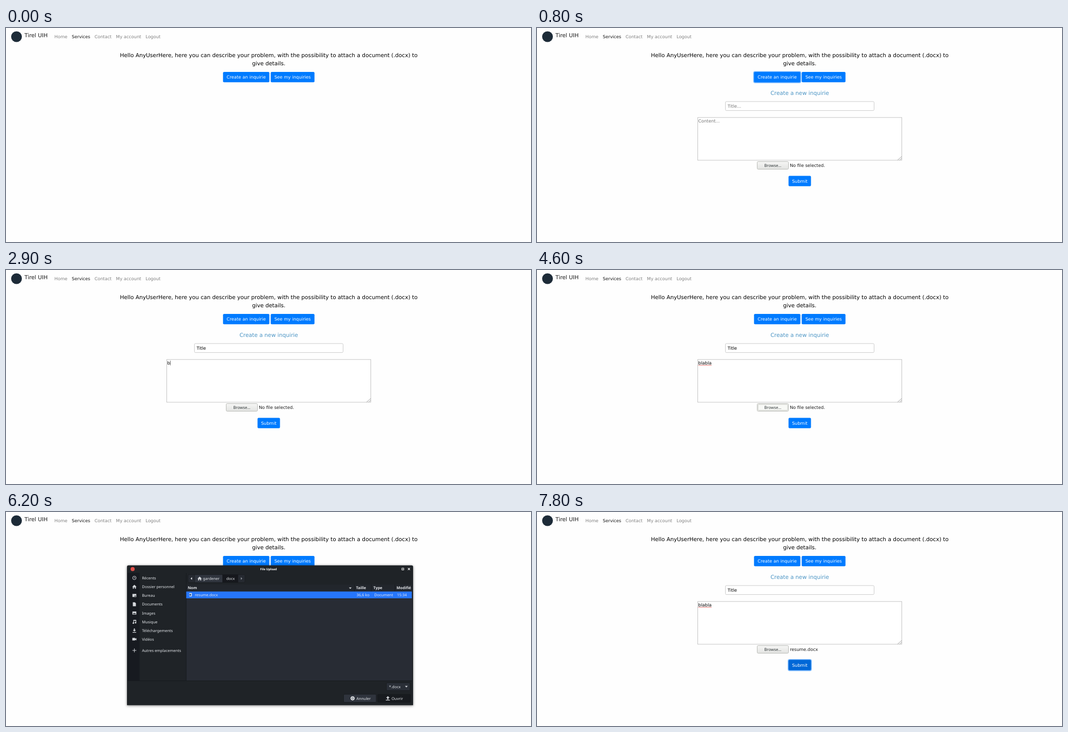
Recreate the animation shown at these times as an HTML page. Size 1024 px wide and 419 px high, loop 8 s.

```html
<!DOCTYPE html>
<html lang="en">
<head>
<meta charset="utf-8">
<title>Inquiry form</title>
<style>
  html, body { margin: 0; width: 100%; height: 100%; overflow: hidden; background: #fefefe; }
  svg { display: block; width: 100%; height: 100%; }
  text { font: 8.533px "DejaVu Sans", sans-serif; fill: #191919; text-rendering: geometricPrecision; white-space: pre; }
  .big { font-size: 10.667px; }
  .mid { text-anchor: middle; }
  .off { fill: #7f7f7f; }
  .btn text { fill: #fff; text-anchor: middle; }
  .field { fill: #fff; stroke: #c6c6c6; stroke-width: .9; }
  .caret { width: .6px; height: 9px; fill: #000; }
  #browse text { font: 7.9px "Noto Sans", sans-serif; fill: #2e3436; }
  #dialog { filter: drop-shadow(0 1px 2.5px rgba(0, 0, 0, .5)); }
  #dialog text { font: 7.467px "Noto Sans", sans-serif; fill: #e3e6ea; }
  #dialog .bold { font-weight: 700; }
  .icon { fill: #d5d8dc; }
  .line { fill: none; stroke: #d5d8dc; }
</style>
</head>
<body>
<svg viewBox="0 0 1024 419">
  <defs>
    <linearGradient id="plain" x2="0" y2="1">
      <stop stop-color="#f6f6f5"/><stop offset="1" stop-color="#e3e4e2"/>
    </linearGradient>
  </defs>
  <rect width="1024" height="419" fill="#fefefe"/>

  <circle cx="20.5" cy="17" r="10.5" fill="#1d2b38"/>
  <text class="big" x="36" y="18.3">Tirel UIH</text>
  <g>
    <text class="off" x="94.6" y="20.2">Home</text>
    <text x="128.3" y="20.2">Services</text>
    <text class="off" x="172.8" y="20.2">Contact</text>
    <text class="off" x="214.6" y="20.2">My account</text>
    <text class="off" x="272.3" y="20.2">Logout</text>
  </g>

  <g fill="#000">
    <text class="big mid" x="512.5" y="57" style="fill:#000">Hello AnyUserHere, here you can describe your problem, with the possibility to attach a document (.docx) to</text>
    <text class="big mid" x="512.5" y="73" style="fill:#000">give details.</text>
  </g>

  <g class="btn" id="create">
    <rect x="423.3" y="86.1" width="90.4" height="20.2" rx="2.1"/>
    <text x="468.5" y="99.3">Create an inquirie</text>
  </g>
  <g class="btn">
    <rect x="516.3" y="86.1" width="85.4" height="20.2" rx="2.1" fill="#007bff"/>
    <text x="559" y="99.3">See my inquiries</text>
  </g>

  <g id="form">
    <text class="big mid" x="512.5" y="131" style="fill:#4a94c4">Create a new inquirie</text>
    <rect class="field" id="titleBox" x="367.5" y="144" width="290" height="17.6" rx="2.1"/>
    <text id="title" x="371.8" y="156.1"></text>
    <rect class="caret" id="titleCaret" y="148.6"/>

    <rect class="field" x="313.5" y="175.2" width="398" height="83.7" style="stroke:#bcbcbc"/>
    <path d="M703.5 258.5l8-7M707.5 258.5l4-3.5" stroke="#777" stroke-width=".7"/>
    <text id="body" x="314.5" y="185.2"></text>
    <rect class="caret" id="bodyCaret" y="177.6"/>
    <path id="squiggle" fill="none" stroke="#e2433b" stroke-width=".7"/>

    <g id="browse">
      <rect id="browseBox" x="429.5" y="261.5" width="61" height="15" rx="2" stroke="#b9bab6"/>
      <rect id="browseFocus" x="431.2" y="263.2" width="57.6" height="11.6" rx="1" fill="none" stroke="#b4b6b1" stroke-width=".7"/>
      <text class="mid" x="460" y="271.8">Browse…</text>
    </g>
    <text id="file" x="493.2" y="272"></text>

    <g class="btn" id="submit">
      <rect x="490.6" y="289.6" width="43.8" height="20.2" rx="2.1"/>
      <text x="512.5" y="302.5">Submit</text>
    </g>
  </g>

  <g id="dialog">
    <path d="M236 378.3V107.5q0-3 3-3H791q3 0 3 3V378.3z" fill="#1f2327"/>
    <path d="M237 119h23.5v211H237z" fill="#171a20"/>
    <path d="M351.5 142h440.5v188H351.5z" fill="#282c34"/>
    <path d="M351.5 142h440.5v13.5H351.5z" fill="#22262c"/>
    <path d="M237 330.5H793M351.5 119.500V330M679.5 142v13.500M712.5 142v13.500M758.5 142v13.500" stroke="#15181c" stroke-width=".8"/>

    <circle cx="247" cy="111.800" r="4" fill="#e2504a"/>
    <text class="bold mid" x="512" y="114" style="font-size:5.87px;fill:#fff">File Upload</text>
    <rect x="772.2" y="110" width="3.600" height="3.400" class="line" style="stroke:#fff"/>
    <path d="M783.900 109.700l4 4m0-4l-4 4" class="line" style="stroke:#fff;stroke-width:1.2"/>

    <g stroke="#16191d" stroke-width=".6">
      <rect x="355" y="122.700" width="111" height="15.300" rx="2" fill="#262a31"/>
      <path d="M368 122.700h54.500V138H368z" fill="#30353e"/>
      <path d="M422.500 122.700h30V138h-30z" fill="#16181d"/>
    </g>
    <path d="M363 127.800v5l-3-2.500z" class="icon"/>
    <path d="M458 127.800v5l3-2.500z" fill="#858a91"/>
    <path d="M373.500 130.500l4.200-4 4.200 4h-1.200v3.500h-2v-2.500h-2v2.500h-2v-3.500z" class="icon"/>
    <text x="384" y="133">gardener</text>
    <text x="429.700" y="133">docx</text>

    <text class="bold" x="354.500" y="151.400">Nom</text>
    <path d="M668.800 147.700h5.400l-2.700 2.900z" class="icon"/>
    <text class="bold" x="682.800" y="151.400">Taille</text>
    <text class="bold" x="716.500" y="151.400">Type</text>
    <text class="bold" x="761.800" y="151.400">Modifié</text>

    <rect id="row" x="351.500" y="155.700" width="440" height="13.300" fill="#2676fc"/>
    <rect x="357.600" y="158.800" width="4.800" height="6.400" rx=".5" fill="#dce6f2"/>
    <rect x="358" y="160.500" width="3" height="3.200" fill="#2b579a"/>
    <text x="368.200" y="165">resume.docx</text>
    <text x="683.800" y="165">36,6 ko</text>
    <text x="718.300" y="165">Document</text>
    <text x="762.800" y="165">15:34</text>

    <g id="places"></g>

    <g stroke="#15181c" stroke-width=".7">
      <rect x="742" y="334.500" width="46" height="15" rx="1.500" fill="#2a2f37"/>
      <rect x="658.500" y="357" width="63.500" height="15.500" rx="1.500" fill="#2f343d"/>
      <rect id="open" x="725" y="357" width="64" height="15.500" rx="1.500"/>
    </g>
    <text x="747" y="344.700">*.docx</text>
    <path d="M778.200 340.500h5.400l-2.700 3z" class="icon"/>
    <circle cx="676" cy="364.800" r="3.500" fill="#d5d8dc" stroke="#fff"/>
    <circle cx="676" cy="364.800" r="1.900" fill="none" stroke="#4a5058" stroke-width=".8"/>
    <text x="683.600" y="367.800">Annuler</text>
    <g id="openLabel">
      <path d="M744.800 360.500l3.500 3.600h-2.400v3h-2.200v-3h-2.400zM740.800 367.800h8v1.300h-8z" class="icon"/>
      <text x="752" y="367.800">Ouvrir</text>
    </g>
  </g>
</svg>
<script>
const $ = id => document.getElementById(id);
const ramp = (t, a, b) => Math.min(1, Math.max(0, (t - a) / (b - a)));
const show = (id, on) => $(id).setAttribute("opacity", +on);
const within = (t, a, b) => t >= a && t < b;

// Icons are drawn around the point (0, 0)
const places = [
  ["Récents", 129, '<circle r="3.400" class="line"/><path d="M0-2V.3L1.500 0" class="line" stroke-width=".8"/>'],
  ["Dossier personnel", 146.2, '<path d="M-4.200 .4L0-3.800 4.200 .4H3V4H1V1.300H-1V4H-3V.4z"/>'],
  ["Bureau", 163.4, '<path d="M-3.800-3H3.800V3H-3.800z"/><path d="M.3 .4h2.500v1.600H.3z" fill="#171a20"/>'],
  ["Documents", 180.6, '<path d="M-3-3.800H1L3-1.800V3.800H-3z"/>'],
  ["Images", 197.8, '<path d="M-3.800-3H3.800V3H-3.800z"/><path d="M-2.800 2L-1 -.5 .3 1 1.500-.3 2.900 2z" fill="#171a20"/>'],
  ["Musique", 214.9, '<path d="M-2-3.600H3.600V2H2.400V-1.800H-.8V3H-2z"/><circle cx="-2" cy="2.500" r="1.500"/><circle cx="2.300" cy="1.800" r="1.500"/>'],
  ["Téléchargements", 232, '<path d="M-.9-4H.9V-1H3L0 2-3-1H-.9zM-3.500 3H3.500V4.200H-3.500z"/>'],
  ["Vidéos", 249.1, '<path d="M-4-2.500H1.500V-.8L4-2.300V2.300L1.500 .8V2.500H-4z"/>'],
  ["Autres emplacements", 271, '<path d="M-3.800 0H3.800M0-3.800V3.800" class="line"/>']
];
$("places").innerHTML = places.map(([name, y, icon]) =>
  `<g class="icon" transform="translate(250.400 ${y})">${icon}</g><text x="265.200" y="${y + 2.8}">${name}</text>`).join("");
$("squiggle").setAttribute("d", "M314.500 187.200" + "l1-1.200l1 1.200".repeat(13));

// Each entry: [time, text]
const titleKeys = [[1700, "T"], [1900, "Ti"], [2000, "Tit"], [2100, "Titl"], [2200, "Title"]];
const bodyKeys = [[2900, "b"], [3100, "bla"], [3300, "blab"], [3400, "blabl"], [3600, "blabla"]];

function type(id, t, keys, hint, focused) {
  const typed = keys.filter(k => k[0] <= t).pop();
  const el = $(id), caret = $(id + "Caret");
  el.textContent = typed ? typed[1] : hint;
  el.style.fill = typed ? "#000" : "#757575";
  const width = typed ? el.getComputedTextLength() : 0;
  caret.setAttribute("x", +el.getAttribute("x") + width + .1);
  show(id + "Caret", focused);
}

function button(id, hover, ring) {
  const box = $(id).firstElementChild;
  box.setAttribute("fill", `rgb(0 ${123 - 20 * hover} ${255 - 40 * hover})`);
  box.style.filter = "none";
  box.style.stroke = `rgba(0, 123, 255, ${ring * .5})`;
  box.style.strokeWidth = "3.200px";
  box.style.paintOrder = "stroke";
}

function draw(t) {
  button("create", ramp(t, 0, 200) - ramp(t, 600, 800), ramp(t, 200, 500) - ramp(t, 1000, 1200));
  button("submit", ramp(t, 6900, 7200), ramp(t, 7500, 7800));
  show("form", t >= 300);

  const inTitle = within(t, 1100, 2500);
  type("title", t, titleKeys, "Title...", inTitle);
  type("body", t, bodyKeys, "Content...", within(t, 2500, 4600));
  $("titleBox").style.stroke = inTitle ? "#9cc6f2" : "#c6c6c6";
  show("squiggle", t >= 4600);

  $("browseBox").setAttribute("fill", within(t, 4400, 6500) ? "#f8f9f6" : "url(#plain)");
  show("browseFocus", within(t, 4600, 6400) || within(t, 6500, 7600));
  $("file").textContent = t < 6400 ? "No file selected." : "resume.docx";

  show("dialog", 0);
  if (t < 6400) $("dialog").setAttribute("opacity", ramp(t, 4600, 4900));
  show("row", t >= 6000);
  $("open").setAttribute("fill", t < 6000 ? "#23272d" : t < 6100 ? "#2f343d" : t < 6200 ? "#3a404a" : "#181b1f");
  show("openLabel", t < 6000 ? .5 : 1);
}

function tick(now) {
  draw(Math.floor(now % 8000 / 100) * 100);
  requestAnimationFrame(tick);
}
draw(0);
requestAnimationFrame(tick);
</script>
</body>
</html>
```
